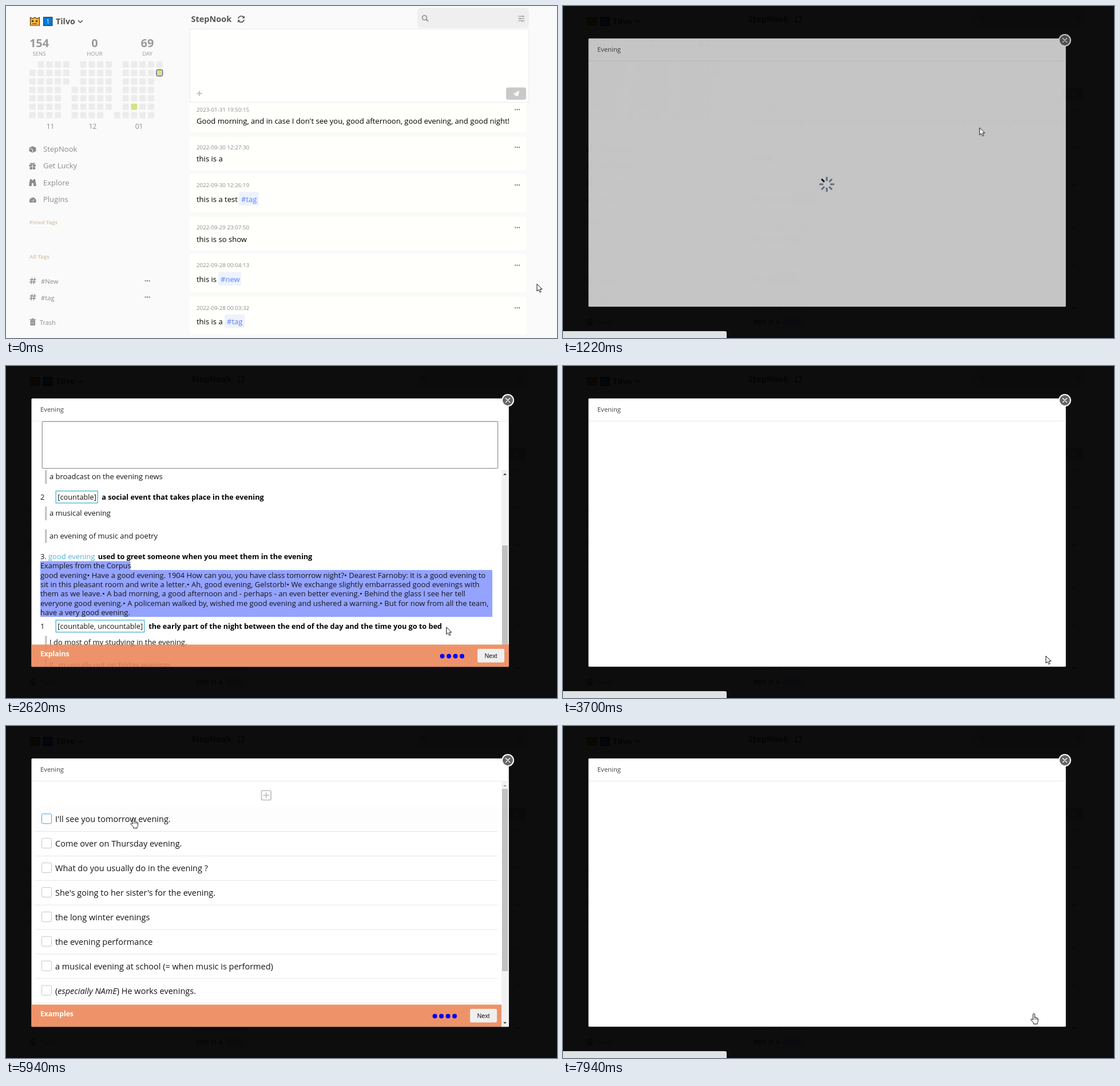
Write an HTML page that moves like this. It is 963 px wide and 581 px high and loops after 8 s.

```html
<!DOCTYPE html>
<html lang="en">
<head>
<meta charset="utf-8">
<title>Word lookup</title>
<style>
html, body { margin: 0; width: 100%; height: 100%; overflow: hidden; background: #fafafa; }
#stage { display: block; width: 963px; height: 581px; font-family: "Open Sans", "Noto Sans", sans-serif; }
text { white-space: pre; }
.b { font-weight: 700; }
.m { text-anchor: middle; }
.line { fill: none; stroke-linecap: round; stroke-linejoin: round; }
.btn { font-family: "Liberation Sans", Arial, sans-serif; }
.turn { animation: turn calc(8s / 9) steps(12) infinite; }
@keyframes turn { to { transform: rotate(360deg); } }
</style>
</head>
<body>
<svg id="stage" viewBox="0 0 963 581" width="963" height="581"></svg>
<script>
const LOOP = 8000;
const css = [];

// frames: { ms: declarations }
function key(name, ease, frames) {
  const body = Object.entries(frames).map(([ms, d]) => `${ms / LOOP * 100}%{${d}}`).join('');
  css.push(`@keyframes ${name}{${body}}.${name}{animation:${name} ${LOOP}ms ${ease} infinite}`);
}
const show = (name, on, off) =>
  key(name, 'step-end', { 0: 'opacity:0', [on]: 'opacity:1', [off]: 'opacity:0' });
const move = (x, y) => `transform:translate(${x}px,${y}px)`;

const text = (x, y, s, size = 13, fill = '#151515', cls = '') =>
  `<text x="${x}" y="${y}" font-size="${size}" fill="${fill}" class="${cls}">${s}</text>`;
const rect = (x, y, w, h, fill, more = '') =>
  `<rect x="${x}" y="${y}" width="${w}" height="${h}" fill="${fill}" ${more}/>`;
const path = (d, fill, more = '') => `<path d="${d}" fill="${fill}" ${more}/>`;
const line = (d, color, w) => `<path class="line" d="${d}" stroke="${color}" stroke-width="${w}"/>`;
const group = (cls, s, at = '0,0') => `<g class="${cls}" transform="translate(${at})">${s}</g>`;
const dots = (x, y) => [0, 3.5, 7].map(d => rect(x + d - 1, y - 1.2, 2.4, 2.4, '#8c8c8c', 'rx="1"')).join('');

function heatmap() {
  const spans = '16 06 06 06 02 36 06 06 06 05 66 06 06 06 06 01'.split(' ');
  let s = '';
  spans.forEach(([from, to], c) => {
    for (let r = +from; r <= +to; r++) {
      const today = c === 15 && r === 1, busy = today || (c === 12 && r === 5);
      s += rect(40.8 + c * 14.8, 96.8 + r * 14.8, 11, 11, busy ? '#d6e27f' : '#ececec',
        `rx="2" ${today ? 'stroke="#2f2fc0"' : ''}`);
    }
  });
  return s;
}

function sidebar() {
  const g = '#8c8c8c';
  let s = path('M42.5 20l3.500 2 4.500-2 4.500 2 3.500-2v14h-16z', '#f6b63c', 'stroke="#59401c" stroke-width="1.200"') +
    rect(45, 25, 3, 3, '#59401c') + rect(52, 25, 3, 3, '#59401c') + rect(46, 30, 8, 2, '#d8502f') +
    rect(65.5, 19.5, 15.5, 15, '#0b78d4', 'stroke="#123a60"') + text(73.3, 31, '1', 10, '#fff', 'm') +
    text(87, 32, 'Tilvo', 14.2, '#555', 'b') + line('M126.5 25.5l3.5 3.5 3.5-3.5', '#555', 1.6);
  [['154', 'SENS', 58], ['0', 'HOUR', 155], ['69', 'DAY', 247]].forEach(([n, label, x]) => {
    s += text(x, 72, n, 20, '#9a9a9a', 'b m') + text(x, 86.5, label, 9.6, '#9a9a9a', 'm');
  });
  s += heatmap();
  [['11', 77.5], ['12', 151.5], ['01', 232.5]].forEach(([n, x]) => s += text(x, 214.5, n, 12, g, 'm'));
  ['StepNook', 'Get Lucky', 'Explore', 'Plugins'].forEach((n, i) => s += text(65, 255 + i * 29.4, n, 13, g));
  s += path('M40.5 248l6-2.7 6 2.7v6l-6 3-6-3z', g) + line('M42 249l4.5 2v5', '#fafafa', 1) +
    rect(40.5, 277.5, 11.5, 3.2, g) + rect(41.5, 281.5, 9.5, 4.5, g) +
    line('M46.3 277c-2-4-5-1-2.5 0h5c2.5-1-.5-4-2.5 0', g, 1.3) + line('M46.3 277.5v9', '#fafafa', 1) +
    path('M42 303h3v2h3v-2h3l2 12h-5v-5h-3v5h-5z', g) +
    path('M41.5 344a6 6 0 1 1 10.5 0z', g) + line('M46.7 342l2-3M43.5 340h.1M45 336.5h.1', '#fafafa', 1.2);
  s += text(41, 382, 'Pined Tags', 9.4, '#dccbb0', 'b') + text(41, 441.5, 'All Tags', 9.4, '#dccbb0', 'b');
  [['#New', 481], ['#tag', 509.5]].forEach(([n, y]) => {
    s += line(`M42 ${y - 2}h10M41.5 ${y + 2}h10M45.5 ${y - 5}l-1.5 10M50 ${y - 5}l-1.5 10`, g, 1.5) +
      text(61, y + 5, n, 11.2, g) + dots(243.5, y);
  });
  return s + rect(42.5, 550, 8.5, 9, g, 'rx="1"') + rect(41.5, 548, 10.5, 1.5, g) + rect(45, 546.8, 3.5, 1.5, g) +
    line('M45.3 552v5M48.3 552v5', '#fafafa', .8) + text(59, 557.5, 'Trash', 10.9, g);
}

function notes() {
  // top, height, date baseline, text baseline, date, text, tag, tag x
  const cards = [
    [160, 61, 184.5, 206, '2023-01-31 19:50:15', "Good morning, and in case I don't see you, good afternoon, good evening, and good night!"],
    [229, 58, 250.5, 272, '2022-09-30 12:27:30', 'this is a'],
    [295, 66, 316.5, 342.5, '2022-09-30 12:26:19', 'this is a test', '#tag', 407],
    [369, 58, 391, 412.5, '2022-09-29 23:07:50', 'this is so show'],
    [435, 66, 457, 482.5, '2022-09-28 00:04:13', 'this is', '#new', 371],
    [509, 66, 531.5, 557, '2022-09-28 00:03:32', 'this is a', '#tag', 382]
  ];
  return cards.map(([y, h, dy, ty, date, body, tag, tx]) =>
    rect(321, y, 588, h, '#fffffc', 'rx="3"') + text(333, dy, date, 9.75, '#8c8c8c') + dots(890, dy - 3.2) +
    text(333, ty, body, 13.06, '#000') +
    (tag ? rect(tx, ty - 17, tag === '#new' ? 40 : 35, 23.5, '#edf2fd', 'rx="2"') + text(tx + 4, ty, tag, 13, '#5a82f2') : '')
  ).join('');
}

function page() {
  const word = rect(730.5, 191, 48, 19, '#0078d7') + text(731, 206, 'evening', 13.06, '#fff');
  return rect(0, 0, 963, 581, '#fafafa') + sidebar() + notes() + group('word', word) +
    text(323.5, 28, 'StepNook', 14.5, '#555', 'b') +
    line('M406 21.5a5.3 5.3 0 0 1 9.5-1.5M416 24.5a5.3 5.3 0 0 1-9.5 1.5', '#555', 1.7) +
    path('M417 17v4.5h-4.5zM405 29v-4.5h4.5z', '#555') +
    rect(719, 3, 195, 35.5, '#efefef', 'rx="6"') +
    '<circle cx="731.5" cy="20.5" r="3.9" fill="none" stroke="#999" stroke-width="1.9"/>' + line('M734.5 23.5l3 3', '#999', 2) +
    line('M895.5 18h10.5M895.5 22h10.5M895.5 26h10.5M903 17v2M898.5 21v2M902 25v2', '#8c8c8c', 1.2) +
    rect(321.5, 40.5, 592, 128, '#fffffe', 'stroke="#ebebeb"') +
    line('M338 149.5v7M334.5 153h7', '#c2c2c2', 2.2) +
    rect(874, 142.5, 35, 21.5, '#c9c9c9', 'rx="4"') + path('M886 154l11-6-2 10-3.5-1.5-2 2v-3l5-5-6 4.5z', '#fff');
}

const bracket = (y, s, w) =>
  rect(87.2, y - 15.3, w, 21, 'none', 'stroke="#58b8d3" stroke-width="1.4"') + text(90.3, y, s, 12.75);
const quote = (y, s) => rect(68, y - 16, 3.5, 24, '#c6c6c6') + text(76, y, s, 12.95);
const bold = (x, y, s) => text(x, y, s, 12.65, '#000', 'b');

function sense(y) {
  const lines = ['I do most of my studying in the evening.', 'I’<tspan x="92">m usually out on Friday evenings.</tspan>',
    'What are you doing tomorrow evening?', 'Belto left yesterday evening.',
    'I’<tspan x="92">ll see you this evening.</tspan>', 'It was early evening by the time we got home.',
    'We had just finished our evening meal when the doorbell rang.', 'a broadcast on the evening news'];
  return text(60, y, '1') + bracket(y, '[countable, uncountable]', 154.5) +
    bold(249.3, y, 'the early part of the night between the end of the day and the time you go to bed') +
    lines.map((s, i) => quote(y + 28 + i * 39.8, s)).join('');
}

function dictionary() {
  const corpus = ['good evening• Have a good evening. 1904 How can you, you have class tomorrow night?• Dearest Farnoby: It is a good evening to',
    'sit in this pleasant room and write a letter.• Ah, good evening, Gelstorb!• We exchange slightly embarrassed good evenings with',
    'them as we leave.• A bad morning, a good afternoon and - perhaps - an even better evening.• Behind the glass I see her tell',
    'everyone good evening.• A policeman walked by, wished me good evening and ushered a warning.• But for now from all the team,',
    'have a very good evening.'];
  return sense(203.5) +
    text(60, 546, '2') + bracket(546, '[countable]', 73) + bold(167.3, 546, 'a social event that takes place in the evening') +
    quote(574, 'a musical evening') + quote(613.7, 'an evening of music and poetry') +
    text(60, 649.5, '3.') + text(74, 649.5, 'good evening', 13, '#4fb5d3') +
    bold(160.7, 649.5, 'used to greet someone when you meet them in the evening') +
    rect(60, 653.5, 157.5, 16.5, '#94a3ff') + rect(60, 669, 790, 82, '#94a3ff') +
    text(60, 666, 'Examples from the Corpus', 12.8) +
    corpus.map((s, i) => text(60, 682.5 + i * 16.4, s)).join('') + sense(772);
}

function spinner(x, cls) {
  let s = '';
  for (let i = 0; i < 12; i++)
    s += `<path d="M0-6.5V-11.3" transform="rotate(${i * 30})" stroke="#000" stroke-width="2.2" stroke-linecap="round" opacity="${.27 + .73 * (i / 11) ** 2.5}"/>`;
  return group(cls, `<g class="turn">${s}</g>`, `${x},312`);
}

function petals() {
  let s = '';
  for (let i = 0; i < 8; i++)
    s += `<path d="M0-6V-13" transform="rotate(${i * 45})" stroke="${i === 7 ? '#0c0e12' : '#5c6b85'}" stroke-width="3"/>`;
  return group('petals', s, '461,312');
}

function footer(cls, label, right) {
  let s = rect(44.5, 487.5, right - 44.5, 38.8, '#ec8555', 'opacity=".88"') + text(60, 508, label, 12.2, '#fff', 'b');
  for (let i = 0; i < 4; i++) s += `<circle cx="${right - 116.5 + i * 11.5}" cy="507.7" r="4" fill="#00f"/>`;
  return group(cls, s + rect(right - 55, 495, 47, 23.7, '#efefef', 'rx="2"') + text(right - 31.5, 511, 'Next', 10.8, '#111', 'btn m'));
}

const clip = (y, h, s) => `<svg x="45" y="${y}" width="834" height="${h}" viewBox="45 ${y} 834 ${h}">${s}</svg>`;

function explains() {
  const bar = rect(866, 182, 12.5, 306, '#f1f1f1') + path('M869 191l3-3.5 3 3.5z', '#a3a3a3', 'class="up"') +
    group('thumb', rect(867, 196, 10, 400, '#c1c1c1'));
  return rect(63.2, 97.2, 796.4, 82, '#fff', 'rx="1" stroke="#777"') +
    clip(182, 344, group('scroll', dictionary())) + clip(182, 306, bar) +
    spinner(461, 'spin1') + footer('foot1', 'Explains', 879);
}

function examples() {
  const rows = ["I'll see you tomorrow evening.", 'Come over on Thursday evening.', 'What do you usually do in the evening ?',
    "She's going to her sister's for the evening.", 'the long winter evenings', 'the evening performance',
    'a musical evening at school (= when music is performed)', '(<tspan font-style="italic">especially NAmE</tspan>) He works evenings.'];
  const check = color => rect(62.5, 153.8, 17, 17, '#fff', `rx="2" stroke="${color}"`);
  const list = rows.map((_, i) => group('', check('#c6c6c6') + rect(51, 184, 808, 1, '#e6e6e6'), `0,${i * 42.9}`)).join('') +
    group('hover', rect(51, 142, 808, 42, '#fdfdfd') + check('#4d9fe0')) +
    rows.map((s, i) => text(86, 168.3 + i * 42.9, s, 14.5)).join('');
  return rect(446.5, 113, 16.5, 16.5, 'none', 'rx="2.5" stroke="#bcbcbc" stroke-width="1.7"') +
    line('M454.8 116.5v9.5M450 121.3h9.5', '#bcbcbc', 1.6) +
    group('list', list) + spinner(455, 'spin2') +
    rect(866, 97, 12.8, 429.3, '#f1f1f1') + rect(867, 110, 10, 319, '#c1c1c1') +
    path('M869 106l3-3.5 3 3.5z', '#a3a3a3') + path('M869 518l3 3.5 3-3.5z', '#505050') +
    footer('foot2', 'Examples', 866);
}

const modal = () => rect(44.5, 56.8, 834.3, 469.5, '#fff', 'rx="1.5"') + rect(45, 96, 834, 1, '#ececec') +
  text(60, 80.3, 'Evening', 11.25, '#444') + group('page1', explains()) + group('page2', examples()) +
  '<circle cx="877" cy="60" r="10" fill="#666" stroke="#fff" stroke-width="2"/>' + line('M873.5 56.5l7 7M880.5 56.5l-7 7', '#fff', 1.4);

function pointer() {
  const ink = 'stroke="#111" stroke-width="1" stroke-linejoin="round"';
  return group('arrow', path('M.5.5v12.5l3-2.7 2 4.7 2.2-1-2-4.5h3.8z', '#fff', ink), '-.5,-1') +
    group('hand', path('M4.5 11V2a1.5 1.5 0 0 1 3 0v5q1.5-1 2.3.5 1.5-.8 2 .8 1.4-.3 1.5 1.2v4q0 2-1.3 3v2h-6.5v-2L1 11.5q-.5-2 1.3-1.7z', '#fff', ink) +
      line('M7.5 7.5v3M9.8 8v2.5M11.8 9v2', '#111', .7));
}

show('word', 670, 1030);
key('shade', 'step-end', { 0: 'opacity:0', 1030: 'opacity:.948', 8000: 'opacity:.948' });
key('modal', 'linear', { 0: 'opacity:0', 1025: 'opacity:0', 1030: 'opacity:.08', 1100: 'opacity:.28', 1280: 'opacity:1', 8000: 'opacity:1' });
show('petals', 1030, 1280);
show('page1', 1280, 3700);
show('page2', 4000, 7880);
show('spin1', 1280, 1760);
show('spin2', 4000, 4620);
show('list', 4620, 7880);
[['foot1', 1280], ['foot2', 4000]].forEach(([name, t]) => key(name, 'linear',
  { 0: 'opacity:0', [t]: 'opacity:0', [t + 300]: 'opacity:.92', [t + 360]: 'opacity:1', 8000: 'opacity:1' }));
key('status', 'linear', {
  0: 'opacity:0', 1025: 'opacity:0', 1030: 'opacity:1', 1480: 'opacity:1', 1680: 'opacity:0',
  3695: 'opacity:0', 3700: 'opacity:1', 4160: 'opacity:1', 4360: 'opacity:0',
  7875: 'opacity:0', 7880: 'opacity:1', 8000: 'opacity:1'
});
const wheel = (name, d) => key(name, 'ease-in-out', {
  0: move(0, 0), 1860: move(0, 0), 2100: move(0, -d / 3), 2300: move(0, -d * 2 / 3), 2500: move(0, -d), 8000: move(0, -d)
});
wheel('scroll', 312);
wheel('thumb', -118);
key('up', 'step-end', { 0: 'fill:#a3a3a3', 1880: 'fill:#505050', 8000: 'fill:#505050' });

// hovered row by time; -1 is none
const hover = { 0: -1, 4565: 7, 4685: 6, 4805: 5, 4925: 4, 5045: 3, 5165: 2, 5535: 1, 5795: 0,
  6040: 1, 6215: 2, 6372: 3, 6519: 4, 6666: 5, 6813: 6, 6960: 7, 7109: -1, 8000: -1 };
key('hover', 'step-end', Object.fromEntries(Object.entries(hover).map(([t, r]) =>
  [t, r < 0 ? 'opacity:0' : `opacity:1;${move(0, r * 42.9)}`])));

key('pointer', 'linear', {
  0: move(928, 487), 60: move(928, 487), 500: move(770, 168), 700: move(747, 201), 1100: move(747, 201),
  1580: move(672, 251), 1880: move(672, 251), 2620: move(769, 457), 2680: move(811, 489), 3100: move(844, 508),
  4500: move(844, 508), 5280: move(300, 230), 5500: move(300, 230), 5940: move(217, 160), 6300: move(290, 249),
  7140: move(812, 494), 7200: move(817, 494), 7870: move(817, 494), 7940: move(817, 503), 8000: move(817, 503)
});
key('arrow', 'step-end', { 0: 'opacity:1', 4620: 'opacity:0', 8000: 'opacity:0' });
show('hand', 4620, 8000);

document.getElementById('stage').innerHTML = page() +
  group('shade', rect(0, 0, 963, 581, '#000')) + group('modal', modal()) + petals() +
  group('status', path('M0 569h283q3 0 3 3v9H0z', '#dee3e6')) + group('pointer', pointer());
document.head.appendChild(document.createElement('style')).textContent = css.join('\n');
</script>
</body>
</html>
```
